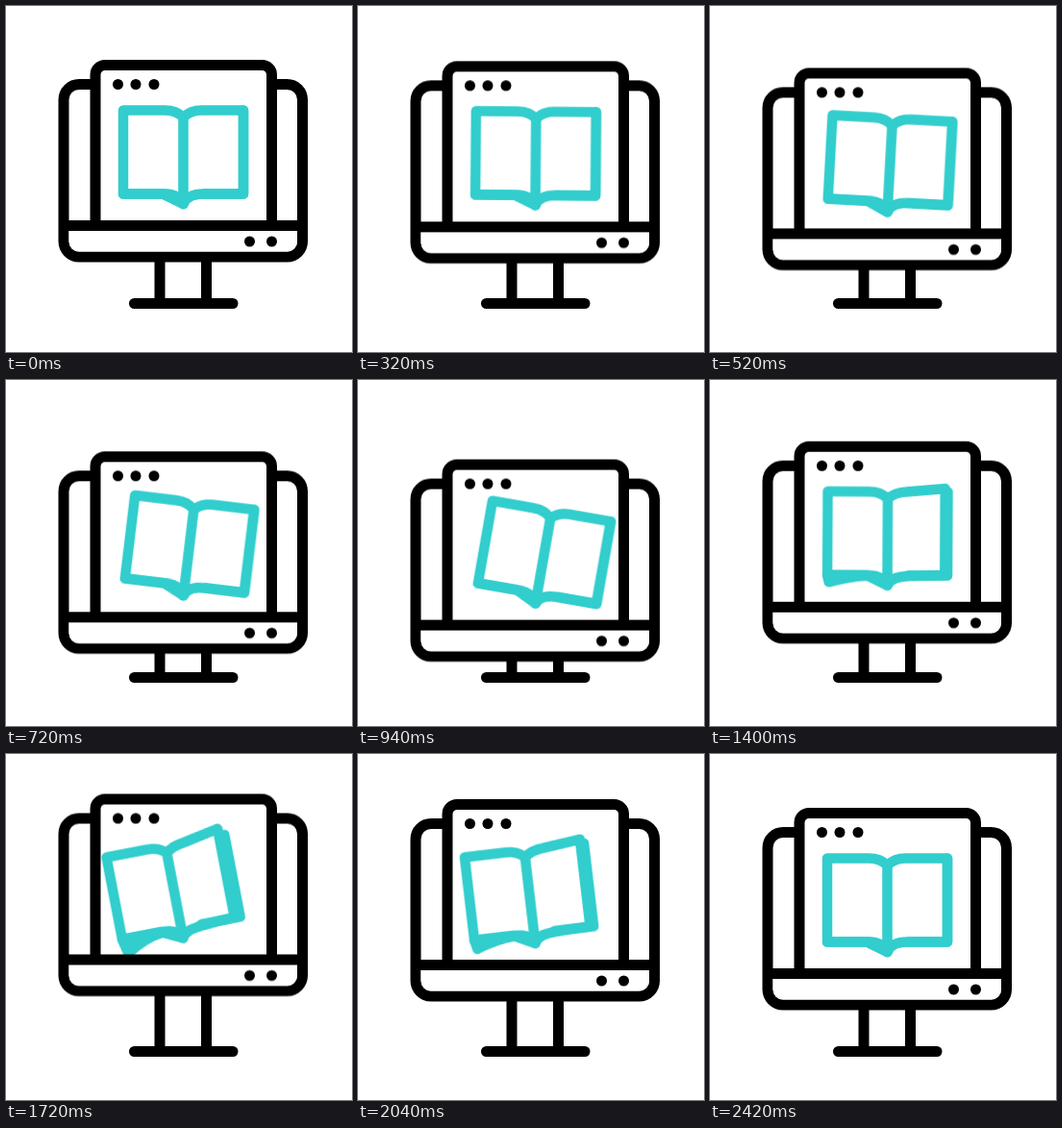
Animation, 360 px wide and 360 px high, one loop 2.62 s. Source, as an HTML page without scripts:

```html
<!DOCTYPE html>
<html lang="en">
<head>
<meta charset="utf-8">
<title>Online reading</title>
<style>
  html, body { margin: 0; width: 100%; height: 100%; overflow: hidden; background: #fff; }
  svg { display: block; width: 100vw; height: 100vh; }

  .ink { fill: none; stroke: #000; stroke-width: 11; }
  .body { fill: #fff; }
  .dots { fill: #000; }
  .book { fill: none; stroke: #32cdcd; stroke-width: 10.5; stroke-linejoin: round; stroke-linecap: round; }
  .fold { fill: #32cdcd; }

  .screen, .book, .page, .fold {
    animation: 2620ms cubic-bezier(.364, 0, .636, 1) infinite;
  }
  .screen { animation-name: bob; }
  .book { animation-name: tilt; transform-origin: 184.5px 207px; }
  .page { animation-name: lift; }
  .fold { animation-name: droop; }

  @keyframes bob {
    0%, 7.63%, 92.37%, 100% { transform: translateY(0); }
    40.84% { transform: translateY(28px); }
    66.98% { transform: translateY(-14.8px); }
  }
  @keyframes tilt {
    0%, 7.63%, 92.37%, 100% { transform: rotate(0deg); }
    40.84% { transform: rotate(10.5deg); }
    66.98% { transform: rotate(-11deg); }
  }
  @keyframes lift {
    0%, 40.84%, 92.37%, 100% {
      d: path("M184.5 116 C190 110 196 108.5 204 108.5 L247 108.5 L247 195.5 L206 195.5 C197 195.5 188 197 184.5 206");
    }
    66.98% {
      d: path("M184.5 116 C190 111 196 109.5 204 108.5 L241 101 L241 194.5 L206 197 C197 198 188 199 184.5 206");
    }
  }
  @keyframes droop {
    0%, 40.84%, 92.37%, 100% {
      d: path("M122 195.5 L122 195.5 C136 195.5 150 195.5 163 195.5 C172 195.5 181 197 184.5 206 L163 195.5 Z");
    }
    66.98% {
      d: path("M122 195.5 L125.5 211 C138 203 150 198 163 196.5 C172 196 181 197 184.5 206 L163 195.5 Z");
    }
  }
</style>
</head>
<body>
<svg viewBox="0 0 360 360">
  <!-- stand -->
  <g class="ink">
    <path d="M160 235V309M208.5 235V309"/>
    <path d="M133.5 309.5H236" stroke-linecap="round"/>
  </g>

  <g class="screen">
    <!-- monitor and window -->
    <g class="ink">
      <rect class="body" x="60" y="81.5" width="248.5" height="179.5" rx="16"/>
      <path class="body" d="M93 228.5V71.5a10 10 0 0 1 10-10H266.5a10 10 0 0 1 10 10V228.5"/>
    </g>

    <g class="book">
      <path class="fold" d="M122 195.5 L122 195.5 C136 195.5 150 195.5 163 195.5 C172 195.5 181 197 184.5 206 L163 195.5 Z"/>
      <path d="M184.5 116 C179 110 173 108.5 165 108.5 H122 V195.5 H163 C172 195.5 181 197 184.5 206 Z"/>
      <path d="M247 108.5 V195.5 H206"/>
      <path class="page" d="M184.5 116 C190 110 196 108.5 204 108.5 L247 108.5 L247 195.5 L206 195.5 C197 195.5 188 197 184.5 206"/>
    </g>

    <!-- bottom bar -->
    <path d="M65.5 234H303V245a10.5 10.5 0 0 1-10.5 10.5H76a10.5 10.5 0 0 1-10.5-10.5Z" fill="#fff"/>
    <path class="ink" d="M60 228.5H308.5"/>
    <g class="dots">
      <circle cx="116.5" cy="81.5" r="5.5"/>
      <circle cx="135" cy="81.5" r="5.5"/>
      <circle cx="154" cy="81.5" r="5.5"/>
      <circle cx="253.5" cy="245" r="5.5"/>
      <circle cx="276.5" cy="245" r="5.5"/>
    </g>
  </g>
</svg>
</body>
</html>
```
